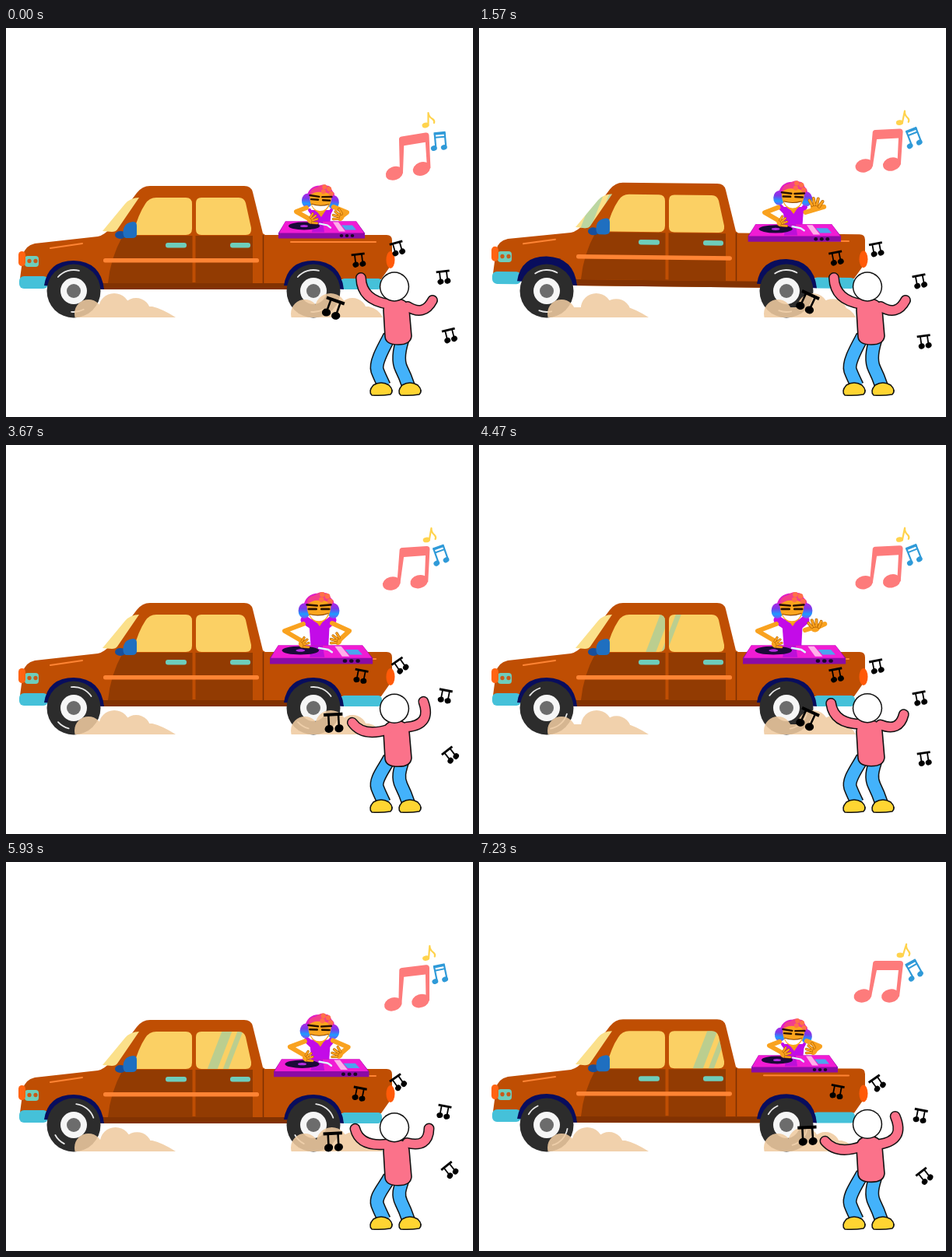
Recreate the animation shown at these times as an HTML page with a canvas. Size 600 by 500 pixels, loop 7.26 s.

```html
<!DOCTYPE html>
<html>
<head>
<meta charset="utf-8">
<style>
html, body { margin: 0; width: 100%; height: 100%; overflow: hidden; background: #fff; }
canvas { display: block; }
</style>
</head>
<body>
<canvas id="stage" width="600" height="500"></canvas>
<script>
const ctx = document.getElementById('stage').getContext('2d');
const LOOP = 7260, TAU = Math.PI * 2;
ctx.lineJoin = 'round';

const mix = (a, b, k) => a + (b - a) * k;
const mixPts = (a, b, k) => a.map((v, i) => mix(v, b[i], k));
const ease = (a, b, x) => {
  const k = Math.min(1, Math.max(0, (x - a) / (b - a)));
  return k * k * (3 - 2 * k);
};
// Piecewise linear curve through [x, y] pairs.
const curve = (keys, x) => {
  const i = Math.max(1, keys.findIndex(k => k[0] >= x));
  const [x0, y0] = keys[i - 1], [x1, y1] = keys[i];
  return mix(y0, y1, (x - x0) / (x1 - x0));
};

function fill(d, color) {
  ctx.fillStyle = color;
  ctx.fill(new Path2D(d));
}
function line(d, color, width, cap = 'round') {
  ctx.strokeStyle = color;
  ctx.lineWidth = width;
  ctx.lineCap = cap;
  ctx.stroke(new Path2D(d));
}
function oval(x, y, rx, ry, color, rot = 0) {
  ctx.fillStyle = color;
  ctx.beginPath();
  ctx.ellipse(x, y, rx, ry, rot, 0, TAU);
  ctx.fill();
}
function box(x, y, w, h, r, color) {
  ctx.fillStyle = color;
  ctx.beginPath();
  ctx.roundRect(x, y, w, h, r);
  ctx.fill();
}
function at(x, y, deg, sx, sy, draw) {
  ctx.save();
  ctx.translate(x, y);
  ctx.rotate(deg * Math.PI / 180);
  ctx.scale(sx, sy);
  draw();
  ctx.restore();
}

// ---- truck ----
const BROWN = '#bf4e03', DARK = '#923b02', TRIM = '#ff8434', TEAL = '#6ecdbb', CYAN = '#45c1d9';
const SHIELD = 'M124 261L153 226Q160 218 171 218L143 259Q141 262 136 262Z';
const WINDOWS = 'M163 265Q170 239 179 226Q184 218 193 218H231Q239 218 239 226V258Q239 266 231 266H168Q162 267 163 265Z' +
  'M251 218H299Q306 218 308 225L315 257Q316 266 308 266H251Q244 266 244 259V225Q244 218 251 218Z';
const LIFT_FRONT = [[0, 0], [310, 0], [360, -6], [430, -5], [580, -3.5], [720, 0], [1100, 0], [1180, -1], [1210, 0]];
const LIFT_REAR = [[0, 0], [310, 0], [360, -1.2], [430, -1], [580, -2.2], [720, 0], [1100, 0], [1180, -.6], [1210, 0]];

function glint(p) {
  const x = 150 + (p - 310) * .178;
  ctx.save();
  ctx.clip(new Path2D(SHIELD + WINDOWS));
  for (const [dx, w] of [[0, 7], [-20, 13]]) {
    const c = x + dx;
    fill(`M${c + 9} 216h${w}L${c - 11 + w} 268h${-w}Z`, 'rgba(125,205,185,.5)');
  }
  ctx.restore();
}

function truckBody(p) {
  const front = curve(LIFT_FRONT, p), rear = curve(LIFT_REAR, p);
  const tilt = (rear - front) / 422;
  ctx.save();
  ctx.transform(1, tilt, 0, 1, 0, front - tilt * 35);
  fill('M18 322L22 292Q24 280 37 277L118 268Q127 266 135 256L168 212Q175 203 185 203H306Q315 203 317 211L330 264' +
    'L333 266H489Q496 266 496 273V303L482 323H430L362 336H122L52 322Z', BROWN);
  fill('M150 267H317V328H131Q134 296 150 267Z', DARK);
  fill('M122 328H362V336H122Z', '#823202');
  line('M241.5 216V327', BROWN, 4, 'butt');
  line('M330.5 266V328', '#7c3002', 1.5, 'butt');
  fill(SHIELD, '#fbe08a');
  fill(WINDOWS, '#fbd064');
  glint(p);
  oval(147, 266, 7, 5, '#174f9b');
  fill('M151 258Q153 250 163 249Q168 249 168 254V265Q168 270 162 270H154Q149 268 151 258Z', '#1f6fc0');
  box(205, 276, 27, 6.5, 3, TEAL);
  box(288, 276, 26, 6.5, 3, TEAL);
  box(125, 296, 200, 5.5, 2.5, TRIM);
  line('M57 283L98 277M366 275H475', TRIM, 2);
  oval(494, 298, 5.5, 11, '#ff5a08');
  box(24, 293, 18, 14, 4, TEAL);
  box(16, 287, 9, 19, 4.5, '#ff6412');
  oval(30, 299.5, 2.6, 2.8, '#c85a18');
  oval(38, 299.5, 2.6, 2.8, '#c85a18');
  box(17, 319, 37, 16, 6, CYAN);
  box(430, 322, 53, 14, 5, CYAN);
  for (const x of [87, 395])
    fill(`M${x - 38} 331Q${x - 33} 299 ${x} 299Q${x + 35} 300 ${x + 39} 336Z`, '#080d5d');
  ctx.restore();
}

function wheel(x, p) {
  const y = 338, a = -1.83 + p / 1210 * 3.5 * TAU;
  oval(x, y, 34.5, 34.5, '#2c2c2c');
  ctx.strokeStyle = '#e8e8e8';
  ctx.lineWidth = 1.8;
  ctx.lineCap = 'round';
  for (const [from, to] of [[-.6, .5], [Math.PI - .25, Math.PI + .35]]) {
    ctx.beginPath();
    ctx.arc(x, y, 27, a + from, a + to);
    ctx.stroke();
  }
  oval(x, y, 17, 17, '#f6f6f6');
  oval(x, y, 9, 9, '#6c6c6c');
}

function dust(x, w, p) {
  const sway = 9 * (1 - Math.cos(p / 1210 * TAU));
  ctx.save();
  ctx.beginPath();
  ctx.rect(x, 330, w, 42);
  ctx.clip();
  const puffs = new Path2D();
  for (const [dx, r, cy] of [[18, 18, 367], [51 + sway, 20, 361], [79 + sway * .8, 19, 366 + sway * .1]]) {
    puffs.moveTo(x + dx + r, cy);
    puffs.arc(x + dx, cy, r, 0, TAU);
  }
  puffs.addPath(new Path2D(`M${x} 372L${x + 30} 359L${x + 100} 358Q${x + 113} 361 ${x + w} 372Z`));
  ctx.fillStyle = 'rgba(239,203,160,.87)';
  ctx.fill(puffs);
  ctx.restore();
}

// ---- disc jockey ----
function limb(q) {
  line(`M${q[0]} ${q[1]}L${q[2]} ${q[3]}L${q[4]} ${q[5]}`, '#f9a21f', 6);
}
function hand(x, y, deg, k) {
  at(x, y, deg, k, k, () => {
    oval(0, 0, 6, 5, '#f9a21f');
    line('M-4 -2L-8 -8M-1 -3L-3 -11M2 -3L3 -11M5 -1L9 -8', '#a85a00', 4);
    line('M-4 -2L-8 -8M-1 -3L-3 -11M2 -3L3 -11M5 -1L9 -8', '#f9a21f', 2.8);
  });
}
function head() {
  const dye = ctx.createLinearGradient(0, -12, 0, 14);
  dye.addColorStop(0, '#d01ce8');
  dye.addColorStop(.4, '#7a3be8');
  dye.addColorStop(.65, '#1e9bff');
  dye.addColorStop(1, '#c818e8');
  line('M-16 -2Q-14 -17 0 -17Q14 -17 17 -2', '#e01cc8', 5);
  oval(-17, 1, 7, 9, dye);
  oval(17, 1, 7, 9, dye);
  fill('M-14 -4Q-13 12 0 16Q13 12 14 -4Q12 -13 0 -13Q-12 -13 -14 -4Z', '#fba51d');
  fill('M-14 -6Q-14 -16 -5 -17Q2 -23 7 -20Q13 -20 14 -13Q20 -11 15 -6Q9 -12 1 -11Q-8 -12 -14 -6Z', '#f23f8b');
  for (const [x, y] of [[4, -18], [10, -16], [3, -12], [13, -10]]) oval(x, y, 3, 3, '#ff7048');
  line('M-14 -6L-2 -5M2 -5L14 -6M-12 -1L-3 -1M3 -1L12 -1', '#2a1200', 2.4);
  fill('M-11 5Q0 8 11 4Q8 13 0 13Q-8 13 -11 5Z', '#fff');
  line('M-11 5Q0 8 11 4', '#8a4500', 1);
}
function deck() {
  fill('M-46 -11H45L56 4V11H-55V4Z', '#8b0ba5');
  fill('M-46 -11H45L55 4H-54Z', '#f01cd4');
  fill('M-10 -11H2L4 3H-12Z', '#bd10d8');
  oval(-22, -5, 20, 5, '#1b0a38');
  oval(-22, -5, 5, 1.6, '#b52ce0');
  line('M-2 -8L8 -6L12 -3', '#dff', 2.2);
  fill('M15 -10L22 -10L31 2H23Z', '#ffb0ea');
  fill('M26 -6H40L45 0H31Z', '#4ca4ee');
  for (const x of [26, 33, 40]) oval(x, 7.5, 2.3, 2.1, '#1c0626');
}
function jockey(p) {
  const q = ease(0, 40, p) * (1 - ease(270, 430, p)) + ease(510, 650, p) * (1 - ease(1020, 1170, p));
  const up = ease(240, 350, p) * (1 - ease(800, 950, p));
  const x = mix(404, 402, q), y = mix(222, 212, q), k = mix(1, 1.1, q);
  const top = y + 12, base = mix(254, 264, q);
  fill(`M${x - 13} ${top}H${x + 14}L${x + 12} ${base}H${x - 10}Z`, '#c30be8');
  line(`M${x - 14 - 4 * q} ${top + q}L${x - 9} ${top + 7}M${x + 14 + 3 * q} ${top + q}L${x + 10} ${top + 7}`, '#c30be8', mix(4, 11, q));
  fill(`M${x - 6} ${top}H${x + 7}L${x + 1} ${top + 9}Z`, '#f49a18');
  at(x, y, mix(4, 0, q), k, k, head);
  at(mix(405, 404.5, q), mix(259.5, 269.5, q), 0, mix(1, 1.19, q), mix(1, 1.08, q), deck);

  limb(mixPts([386, 231, 373, 236, 391, 246], [382, 230, 358, 239, 382, 253], q));
  hand(mix(391, 380, q), mix(247, 256, q), 65, .8);
  const low = mixPts([421, 230, 438, 237, 430, 243], [419, 229, 441, 239, 427, 252], q);
  const high = mixPts([420, 235, 442, 231, 431, 229], [419, 240, 445, 228, 433, 232], q);
  const arm = mixPts(low, high, up);
  limb(arm);
  hand(arm[4], arm[5], mix(-60, 5, up), mix(.85, 1, up));
}

// ---- dancer ----
// Each pose: hand, bend and shoulder of the left arm, then of the right arm.
const POSES = [
  [456, 321, 457, 350, 492, 355, 548, 350, 537, 371, 516, 358],
  [446, 350, 454, 373, 491, 365, 542, 340, 545, 367, 515, 362],
  [444, 362, 462, 378, 491, 366, 532, 322, 549, 354, 515, 363]
];
function dancer(t) {
  const c = Math.cos(t / 1565 * TAU);
  const bob = 9.3 * (1 - c * c);
  const a = mixPts(POSES[1], POSES[c > 0 ? 0 : 2], Math.abs(c));
  const arms = [0, 6].map(i => `M${a[i]} ${a[i + 1]}Q${a[i + 2]} ${a[i + 3]} ${a[i + 4]} ${a[i + 5]}`);
  const hip = 396 + bob;
  for (const leg of [`M493 ${hip}C485 ${hip + 15} 474 430 477 440Q480 448 486 460`, `M511 ${hip}C505 ${hip + 17} 503 428 508 438Q513 448 517 460`]) {
    line(leg, '#111', 18, 'butt');
    line(leg, '#43b2fb', 15, 'butt');
  }
  for (const x of [482, 519]) {
    const shoe = `M${x - 12} 472Q${x - 17} 467 ${x - 10} 459Q${x} 453 ${x + 10} 459Q${x + 17} 466 ${x + 12} 471Q${x} 473 ${x - 12} 472Z`;
    fill(shoe, '#ffd532');
    line(shoe, '#111', 1.5);
  }
  arms.forEach(d => line(d, '#111', 14));
  at(0, bob, 0, 1, 1, () => {
    const torso = 'M485 363Q485 349 501 348Q516 348 518 361L521 396Q520 407 504 407Q488 407 487 397Z';
    fill(torso, '#fb728a');
    line(torso, '#111', 1.6);
  });
  arms.forEach(d => line(d, '#fb728a', 11));
  const y = 332.5 + bob;
  oval(499, y, 19.2, 19.2, '#111');
  oval(499, y, 17.7, 17.7, '#fff');
}

// ---- notes ----
function blackNote() {
  oval(-4.5, 6, 4.2, 3.7, '#000', -.3);
  oval(5, 6, 4.2, 3.7, '#000', -.3);
  line('M-4.5 6V-7M5 6V-7', '#000', 1.9, 'butt');
  line('M-9 -7.5H9', '#000', 3, 'butt');
}
// x, y, drift x, drift y, mid angle, swing, scale
const SMALL_NOTES = [
  [453, 298, 7, -3, 0, -11, .95], [503, 283, 9, 1.5, -23, 12, .95], [562, 320, 5, 6, 0, -11, .95],
  [570, 395, 2.5, 9, -23, 15, .95], [420, 360, 2, -9, 11, 14, 1.35]
];
function blackNotes(p) {
  const drift = (1 - Math.cos(p / 970 * TAU)) / 2;
  const swing = Math.cos((p - 600) / 970 * 3 * TAU);
  for (const [x, y, dx, dy, mid, amp, k] of SMALL_NOTES)
    at(x + dx * drift, y + dy * drift, mid + amp * swing, k, k, blackNote);
}
const RISE = [[0, 0], [400, 1], [450, 1], [600, .67], [810, .58], [970, 0]];
function colorNotes(p) {
  const v = curve(RISE, p);
  at(mix(520, 518, v), mix(161, 150, v), mix(-9.5, 0, v), 1, 1, () => {
    const pink = '#fd7b7b';
    oval(-25, 22, 11.5, 8.5, pink, -.2);
    oval(10.5, 22, 11.5, 8.5, pink, -.2);
    fill('M-12 -19Q-12 -23 -8 -23H23Q27 -23 27 -19L22 23H17.5L21 -11H-7L-14 23H-18Z', pink);
  });
  at(mix(555.5, 557, v), mix(145, 139, v), mix(-5, -29, v), 1, 1, () => {
    const blue = '#2f9ad8';
    oval(-6.5, 9, 4, 3.3, blue, -.2);
    oval(6.5, 9, 4, 3.3, blue, -.2);
    line('M-4 9V-10M9 9V-10', blue, 2.2, 'butt');
    line('M-5 -9.5H10', blue, 3.6, 'butt');
    line('M-4 -4.5H9', blue, 2, 'butt');
  });
  at(mix(542, 546, v), mix(118, 114, v), mix(0, 17, v), 1, 1, () => {
    const gold = '#ffd34d';
    oval(-3, 7, 4.5, 3.3, gold, -.3);
    line('M.5 7V-9Q1 -4 6 -1Q9 1 8 4', gold, 2.2);
  });
}

function draw() {
  const t = performance.now() % LOOP, p = t % 1210;
  ctx.fillStyle = '#fff';
  ctx.fillRect(0, 0, 600, 500);
  truckBody(p);
  for (const x of [87, 395]) wheel(x, p);
  dust(88, 130, p);
  dust(366, 118, p);
  jockey(p);
  colorNotes(t % 970);
  blackNotes(t % 970);
  dancer(t);
  requestAnimationFrame(draw);
}
draw();
</script>
</body>
</html>
```
